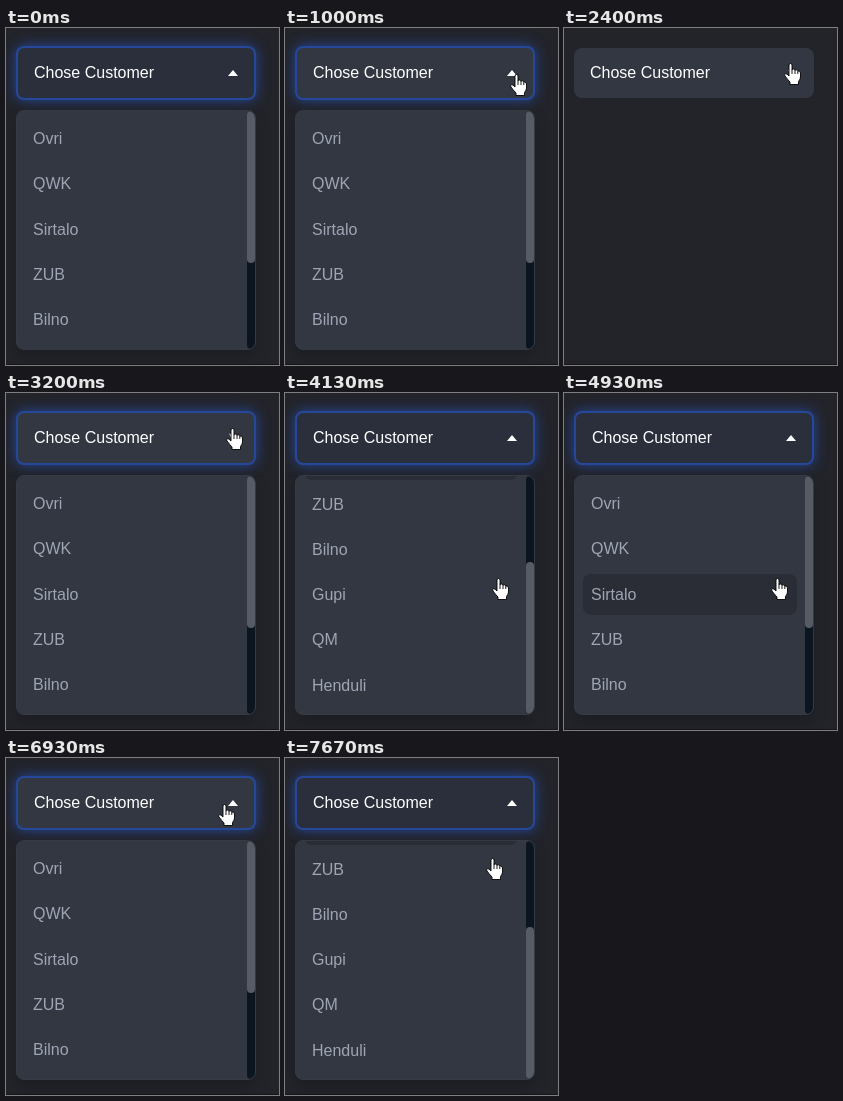
Recreate the animation shown at these times as an HTML page. Size 273 by 337 pixels, loop 8000 ms.

```html
<!DOCTYPE html>
<html lang="en">
<head>
<meta charset="utf-8">
<title>Customer dropdown</title>
<style>
  * { box-sizing: border-box; }
  html, body { margin: 0; width: 100%; height: 100%; overflow: hidden; }
  body { position: relative; background: #23242a; font: 16px/18px "Liberation Sans", Arial, sans-serif; }
  .floor { position: absolute; left: 0; top: 336px; width: 273px; height: 1px; background: #141518; }
  .select {
    position: absolute; left: 10px; top: 20px; width: 240px; height: 50px; padding: 16px;
    display: flex; justify-content: space-between; align-items: center;
    border-radius: 8px; background: #2a2f3b; color: #fff;
  }
  .select.hover { background: #323741; }
  .select.open { top: 18px; height: 54px; border: 2px solid #26489a; box-shadow: 0 0 12.8px #26489a; }
  .caret { border: 5px solid transparent; border-top: 6px solid #fff; border-bottom: 0; }
  .menu {
    position: absolute; left: 10px; top: 82px; width: 240px; height: 240px; overflow: hidden;
    border: 1px solid #363a43; border-radius: 8px; background: #323741; color: #9fa5b5;
    box-shadow: 0 8px 16px rgba(0, 0, 0, .2);
  }
  .list { margin: 0; padding: 8px; width: 230px; list-style: none; }
  .list li { padding: 11.2px 8px; height: 40.4px; margin-bottom: 4.8px; border-radius: 8px; }
  .list li.hover { background: #2a2d35; }
  .track, .thumb { position: absolute; right: 0; top: 0; width: 8px; border-radius: 4px; }
  .track { height: 238px; background: #0b1520; }
  .thumb { height: 152px; background: #575b64; }
  .cursor { position: absolute; left: 0; top: 0; overflow: visible; }
  .cursor path { fill: #fff; stroke: #000; stroke-width: .9; }
</style>
</head>
<body>
<div class="floor"></div>
<div class="select"><span>Chose Customer</span><div class="caret"></div></div>
<div class="menu">
  <ul class="list"></ul>
  <div class="track"></div>
  <div class="thumb"></div>
</div>
<svg class="cursor" width="18" height="23">
  <path class="arrow" d="M.5 .5V16L4 12.7 6.5 18.5 9 17.5 6.5 12H11.5Z"/>
  <g class="hand" transform="translate(-6 0)">
    <path d="M5 13V2Q5 .5 6.5 .5T8 2V7Q8 6 9.5 6T11 7.5Q11 6.8 12.3 6.8T13.8 8.5Q14 8 15 8T16.5 10V14Q16.5 16 14.5 18.5V21.5H6V19Q3.5 16.5 1 13Q0 11.5 1.2 10.8Q2.8 10.2 5 13Z"/>
    <path d="M8 7V11M11 7.5V11M13.8 8.5V11"/>
  </g>
</svg>
<script>
const LOOP = 8000;
const TICKS_PER_MS = 15 / 1000;
const PITCH = 45.2, LIST_TOP = 91, MAX_SCROLL = 135, MAX_THUMB = 86;
const names = ["Ovri", "QWK", "Sirtalo", "ZUB", "Bilno", "Gupi", "QM", "Henduli"];

// Each move: [start tick, end tick, value reached]
const pointerX = [[0, 0, 270], [0, 5, 247], [7, 19, 226], [49, 55, 213], [77, 84, 218], [105, 108, 207]];
const pointerY = [[0, 0, 345], [0, 5, 105], [7, 19, 26], [32, 36, 35], [49, 55, 185], [77, 84, 46], [105, 108, 100]];
const scrolling = [[0, 0, 0], [57, 62, MAX_SCROLL], [68, 74, 0], [110, 115, MAX_SCROLL]];
const caretTurn = [[0, 0, 180], [22, 27, 0], [47, 52, 180], [87, 92, 0], [99, 104, 180]];

const $ = selector => document.querySelector(selector);
const select = $(".select"), caret = $(".caret"), menu = $(".menu"), list = $(".list");
const thumb = $(".thumb"), cursor = $(".cursor"), arrow = $(".arrow"), hand = $(".hand");

const rows = names.map(name => {
  const row = document.createElement("li");
  row.textContent = name;
  list.append(row);
  return row;
});

const show = (element, visible) => element.style.display = visible ? "" : "none";

function valueAt(moves, tick) {
  let value = moves[0][2];
  for (const [start, end, goal] of moves.slice(1)) {
    const p = Math.min(1, Math.max(0, (tick - start) / (end - start)));
    value += (goal - value) * p * p * (3 - 2 * p);
  }
  return value;
}

function draw(ms) {
  const tick = Math.floor((ms + 4) * TICKS_PER_MS);
  const x = valueAt(pointerX, tick), y = valueAt(pointerY, tick);
  const scroll = valueAt(scrolling, tick);
  const open = tick < 23 || (tick >= 48 && tick < 88) || tick >= 100;
  const overSelect = x < 250 && y < 72;
  const overList = open && x < 241 && y >= LIST_TOP;

  select.classList.toggle("open", open);
  select.classList.toggle("hover", overSelect);
  caret.style.transform = `rotate(${valueAt(caretTurn, tick)}deg)`;

  show(menu, open);
  list.style.transform = `translateY(${-scroll}px)`;
  thumb.style.transform = `translateY(${scroll / MAX_SCROLL * MAX_THUMB}px)`;
  // The highlight stays on the third row while the list is scrolled
  const active = !overList ? -1 : scroll > 0 ? 2 : Math.floor((y - LIST_TOP) / PITCH);
  rows.forEach((row, i) => row.classList.toggle("hover", i === active));

  show(cursor, tick > 0);
  cursor.style.transform = `translate(${Math.round(x)}px, ${Math.round(y)}px)`;
  show(hand, overSelect || overList);
  show(arrow, !overSelect && !overList);
}

const began = performance.now();
function loop() {
  draw((performance.now() - began) % LOOP);
  requestAnimationFrame(loop);
}
loop();
</script>
</body>
</html>
```
